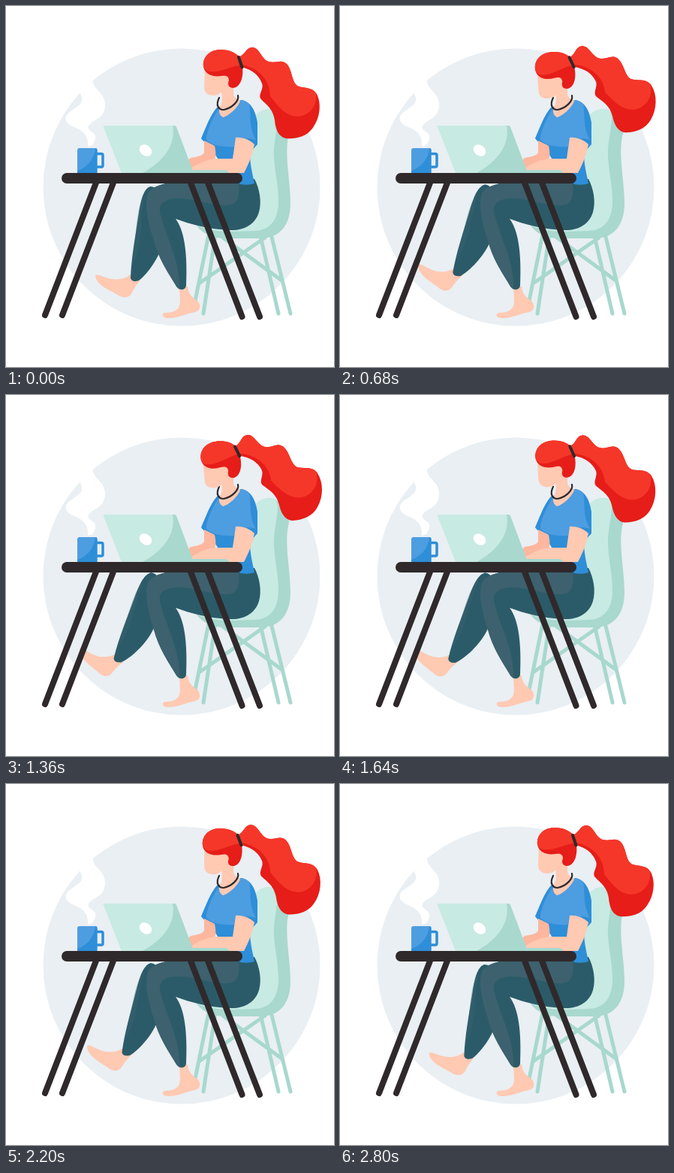
An HTML page that plays this animation: 437 by 480 pixels, repeating every 2840 ms.

```html
<!DOCTYPE html>
<html lang="en">
<head>
<meta charset="utf-8">
<title>Working at a desk</title>
<style>
  html, body { margin: 0; width: 100%; height: 100%; overflow: hidden; background: #fff; }
  svg { display: block; width: 100%; height: 100%; }
  .mint { fill: #c7eae3; } .mint-dark { fill: #a8d8ce; }
  .skin { fill: #ffc9b2; } .skin-dark { fill: #fdb79e; }
  .blue { fill: #4d9de1; } .blue-dark { fill: #2e8ed8; }
  .teal { fill: #3d616e; } .teal-dark { fill: #2b5b69; }
  .red { fill: #f53729; } .red-dark { fill: #e61d18; }
  .line { fill: none; stroke-linecap: round; stroke-linejoin: round; }
  .ink { stroke: #2f292b; }
</style>
</head>
<body>
<svg viewBox="0 0 437 480">
  <circle cx="234" cy="241" r="184.5" fill="#e9eff3"/>
  <path fill="#fff" d="M98 115C106 128 98 132 86 140C76 147 78 156 91 161C103 166 110 172 109 187L115 185C120 177 122 172 114 167C105 161 111 156 122 150C132 144 135 131 129 120C122 110 117 109 115 98L98 98Z"/>

  <g id="chair">
    <path class="line" stroke="#a8d8ce" stroke-width="5" d="M279 304L263 409M270 304L252 392M339 306L363 409M353 303L379 409M257 369L345 308M289 308L366 364"/>
    <path class="mint-dark" d="M345 140C365 135 377 150 377 170C370 195 379 232 379 262C379 288 368 308 340 309L290 309C270 308 260 300 253 291L320 290Z"/>
    <path class="mint" d="M325 160C330 140 346 134 358 138C368 145 356 175 357 200C358 220 363 238 363 260C363 286 350 299 330 299L300 300C280 300 264 297 253 291L310 285Z"/>
  </g>

  <g id="shin">
    <path class="skin" d="M119 359C120 356 125 358 130 360C143 365 155 365 166 357L181 362C174 370 171 375 168 381C164 389 156 389 149 384C139 378 121 372 119 359Z"/>
    <path class="teal-dark" d="M192 240C182 244 179 262 177 276C172 308 167 335 166 362Q168 368 177 365C187 358 205 335 210 312C214 285 213 240 192 240Z"/>
    <path class="teal" opacity=".4" d="M185 252C178 280 183 320 168 346L173 300C175 280 177 262 185 252Z"/>
  </g>

  <g id="front-leg">
    <path class="skin" d="M231 373L242 373C243 385 250 388 256 393C260 399 259 405 252 407C238 409 229 416 214 415C208 414 207 410 211 408C224 408 231 404 232 394Z"/>
    <path class="teal-dark" d="M331 230C338 243 341 261 337 274C332 291 316 299 298 298C270 297 245 290 226 283C238 299 242 330 240 372C239 378 231 379 227 373C215 353 203 335 197 312C189 290 182 258 191 246C200 238 212 236 225 234L310 230Z"/>
    <path class="teal" d="M310 234C313 258 306 265 293 265C268 266 240 250 215 258C204 262 203 270 207 281C213 307 233 340 231 377C217 358 203 335 197 312C188 285 183 258 191 246C200 238 212 236 225 234Z"/>
  </g>

  <g id="torso">
    <path class="blue-dark" d="M281 135L314 125C326 128 332 137 335 155L335 184L325 195C325 212 329 225 331 236Q323 239 312 237L290 215L270 184Q263 181 260 176C267 160 272 145 281 135Z"/>
    <path class="blue" d="M284 136L314 125Q320 126 324 130C327 145 323 160 333 178Q324 175 306 176L304 187C290 188 275 186 267 178C266 170 275 148 284 136Z"/>
    <path class="skin" d="M286 106L303 104L303 117C304 123 310 124 312 127C307 137 297 146 289 148C282 144 284 136 285 134C289 129 288 120 286 106Z"/>
    <path class="skin-dark" d="M264 179C270 182 275 184 278 186C280 195 280 201 277 208L246 217L242 212Q240 206 246 202C256 200 262 199 264 195Z"/>
    <path class="skin" d="M306 175C315 174 325 178 331 184C328 198 324 209 317 222H248L246 216C255 210 264 205 278 203L302 203Z"/>
    <path class="line ink" stroke-width="2.2" d="M284 122C279 132 283 138 290 138C301 136 311 126 309 119"/>
  </g>

  <g id="head">
    <path class="skin" d="M265 84L264 108C264 116 270 119 277 119C283 119 286 115 289 113L302 108L300 84Z"/>
    <path class="red-dark" d="M263 80C262 67 272 58 286 58C297 58 306 62 311 68L315 81C317 97 311 109 302 109C296 108 295 104 297 99C297 93 293 92 287 93C275 95 264 90 263 80Z"/>
    <path class="red" d="M263 80C262 67 272 58 286 58C297 58 306 62 311 68L314 79C303 79 290 86 280 87C272 88 265 87 263 80Z"/>
    <path class="red-dark" d="M312 67C319 64 320 55 328 55C338 55 340 71 350 74C360 77 366 70 374 77C382 86 380 100 388 106C396 110 408 107 414 117C421 131 418 150 408 163C400 174 386 177 373 176C363 174 359 164 358 152C356 136 345 130 339 123C336 117 344 110 341 103C337 92 328 85 314 81Z"/>
    <path class="red" d="M312 67C319 64 320 55 328 55C338 55 340 71 350 74C360 77 366 70 374 77C382 86 380 100 388 106C396 110 407 107 413 116C415 135 402 147 387 147C369 145 360 129 352 120C352 97 335 82 314 78Z"/>
    <path class="line ink" stroke-width="4" d="M310 68L314.500 81.500"/>
  </g>

  <g id="desk">
    <path class="mint-dark" d="M238 218H292Q297 219 297 222H238Z"/>
    <path class="mint" d="M131 159H224Q226 159 227 161L250 222H154L130 161Q129 159 131 159Z"/>
    <path class="mint-dark" d="M222 159H224Q226 159 227 161L250 222H182C210 207 227 184 222 159Z"/>
    <ellipse cx="186" cy="192" rx="9" ry="7" fill="#fff" transform="rotate(38 186 192)"/>
    <rect class="line" x="119" y="196.500" width="10" height="17.500" rx="2" stroke="#2e8ed8" stroke-width="3.500"/>
    <rect class="blue" x="95" y="189" width="26.500" height="34" rx="3"/>
    <path class="blue-dark" d="M121.500 191V222H95V219C108 215 118 203 119 189Q121.500 189 121.500 191Z"/>
    <path class="line ink" stroke-width="8" d="M120 235L52 411M143 235L75 411M246 235L314.500 413M269 235L338 413"/>
    <path class="line ink" stroke-width="14" d="M81 229H308"/>
  </g>
</svg>
<script>
  const LOOP = 2840;
  const head = document.getElementById('head');
  const shin = document.getElementById('shin');

  // Rises to 1 at `peak`, then falls back to 0 at the end of the loop.
  function swing(t, peak, risePower, fallPower) {
    return t < peak
      ? 1 - (1 - t / peak) ** risePower
      : ((LOOP - t) / (LOOP - peak)) ** fallPower;
  }

  const turn = (part, angle, x, y) =>
    part.setAttribute('transform', `rotate(${angle} ${x} ${y})`);

  function draw() {
    const t = performance.now() % LOOP;
    turn(shin, 12 * swing(t, 1580, 2, 1.05), 212, 247);
    turn(head, -9.3 * swing(t, 1150, 1.4, 1.45), 311, 106);
    requestAnimationFrame(draw);
  }
  draw();
</script>
</body>
</html>
```
